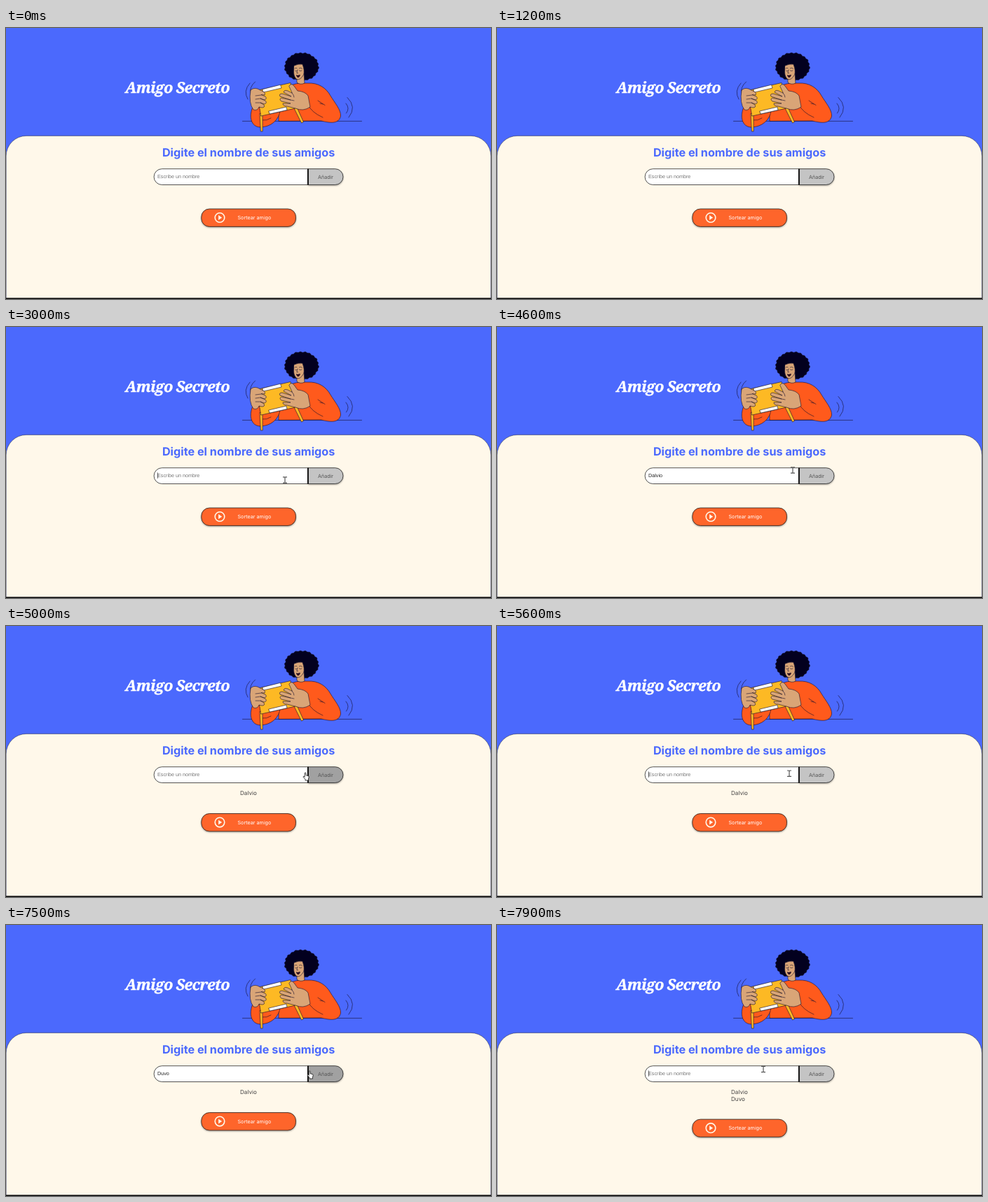
These frames come from a looping animation (692x388 px, 8 s). An HTML page:

```html
<!DOCTYPE html>
<html lang="es">
<head>
<meta charset="utf-8">
<title>Amigo Secreto</title>
<style>
  html, body { margin: 0; width: 100%; height: 100%; overflow: hidden; background: #4b69fd; }
  svg { display: block; width: 100vw; height: 100vh; }
  text { font-family: Inter, sans-serif; font-size: 7.2px; text-rendering: geometricPrecision; white-space: pre; }
  .title { font: italic 700 21.8px "Noto Serif", serif; letter-spacing: -.75px; fill: #fff; stroke: #fff; stroke-width: .35; }
  .heading { font-weight: 700; font-size: 16.23px; fill: #4b69fd; }
  .field { font-family: "Liberation Sans", Arial, sans-serif; }
  .friend { font-size: 8.1px; fill: #444; }
  .mid { text-anchor: middle; }
  .edge { stroke: #1a1a1a; stroke-width: .75; }
  .raised { filter: drop-shadow(.3px 1.8px 1.2px rgba(0, 0, 0, .36)); }
  .ink { stroke: #17102e; stroke-width: .6; stroke-linejoin: round; stroke-linecap: round; }
  .line { fill: none; }
  .skin { fill: #d9a577; }
  .shirt { fill: #ff5a1c; }
  .box { fill: #fdb924; }
</style>
</head>
<body>
<svg viewBox="0 0 692 388" preserveAspectRatio="none">
  <rect width="692" height="388" fill="#4b69fd"/>
  <text class="title" x="170" y="93.4">Amigo Secreto</text>

  <g class="ink">
    <path class="line" d="M337.5 133.4H507.5"/>
    <path class="line" d="M348 79Q338 90 345 102M355.500 77Q346 85 349.500 96M487 99.500Q501 113 489 128M485 108Q491 115 485.500 122"/>
    <path class="shirt" d="M389 133V100C394 88 405 80 420 79H430C446 78 457 86 463 97C469 107 478 117 477.500 126C475 138 462 136 450 133Z"/>
    <path id="hair" fill="#03001f"/>
    <path class="skin" d="M415 69V78Q420 82 426 79L425 64Z"/>
    <path class="skin" d="M411 54Q417 51 423 52Q426.500 61 424.500 67Q420 75 415 73.500Q410.500 70 410.500 63Z"/>
    <path class="line" d="M412 58Q413.500 56.500 415 57.500M418.500 57.500Q420.500 56.500 422.500 58M412.500 61.300Q413.800 62.500 415 61.300M418.500 61Q420.300 62.300 422 61M416 60L414.800 64.500H416.500"/>
    <path fill="#3a0914" d="M414.500 67.800Q417 68.500 419.500 67Q419 70.800 416.500 70.800Q414.500 70 414.500 67.800Z"/>
    <path class="shirt" d="M352 113C346 128 350 141 362 142C378 142 389 132 391 119L384 111Z"/>
    <path class="line" d="M431 110Q436 121 452 128M445 104L455 110.500M448 108L452 109M365 132Q372 133 378 129"/>
    <path class="box" d="M362 123L363.300 148H366.200L366 122ZM409 111L421.500 136L424.500 134.500L413 109Z"/>
    <path class="box" d="M358 89.500L406 78.500L413 115L364 126Z"/>
    <path fill="#fff" d="M366 87.700L391.500 81.300L393 86L367.500 92ZM375 119L400 113L401 117.500L376.500 123Z"/>
    <path class="skin" d="M349 89Q353 85 359 87L367 91Q371 93 369 96L364 95.500L370 98Q373 101 369 103L363 101L370 104Q373 107 369 109L363 107L368 110Q370 114 365 114L361 113Q359 119 353 117Q346 108 349 89Z"/>
    <path class="skin" d="M404 83Q407 78 411 83L416 90Q427 91 431 97L434 113Q424 120 413 115L401 112Q395 112 395 108L406 108L393 105Q389 102 393 100L406 103L391 98Q389 94 394 94L407 98L396 92Q397 88 402 90L408 93Z"/>
    <path class="line" d="M356 97L364 96M356 102L363 101M356 107L363 107M408 93Q411 96 411 99M406 103L411 104"/>
  </g>

  <path d="M.2 387V183.200A28.800 28.800 0 0 1 29 154.400H663A28.800 28.800 0 0 1 691.800 183.200V387Z" fill="#fff8ea" stroke="#101020" stroke-width=".45"/>
  <rect y="386.500" width="692" height="1.500" fill="#0a0a0a"/>
  <text class="heading mid" x="346.100" y="184">Digite el nombre de sus amigos</text>

  <path class="edge" d="M430.500 201.700H222.500A11.400 11.400 0 0 0 222.500 224.500H430.500Z" fill="#fff"/>
  <text id="entry" class="field" x="216" y="215.300"></text>
  <rect id="caret" y="208.400" width=".6" height="8.400" fill="#000"/>
  <g class="raised">
    <path id="add" class="edge" d="M431.200 201.700H469.600A11.400 11.400 0 0 1 469.600 224.500H431.200Z"/>
  </g>
  <path d="M430.900 201.500V224.700" stroke="#000" stroke-width="1.500"/>
  <text class="mid" x="456" y="215.500" fill="#555">Añadir</text>

  <text id="first" class="friend" x="334" y="241.900"></text>
  <text id="second" class="friend" x="334" y="251.500"></text>

  <g id="draw">
    <rect class="edge raised" x="278.800" y="259" width="134.700" height="25.400" rx="11.500" fill="#fe652b"/>
    <circle cx="305" cy="271.500" r="6.800" fill="none" stroke="#fff8ea" stroke-width="1.600"/>
    <path d="M303.100 268.100L308.200 271.500L303.100 274.900Z" fill="#fff8ea"/>
    <text x="330.500" y="274.100" fill="#fff">Sortear amigo</text>
  </g>

  <g id="pointer">
    <path id="arrow" d="M0 0V8.600L2 6.900L3.400 10L4.900 9.300L3.500 6.300H6.200Z" fill="#fff" stroke="#222" stroke-width=".8"/>
    <path id="beam" d="M-3 -4.200H-.7L0 -3.600L.7 -4.200H3M0 -3.600V3.600M-3 4.200H-.7L0 3.600L.7 4.200H3" fill="none" stroke="#555" stroke-width="1.200"/>
    <path id="hand" d="M-1.800 -4.500Q-.9 -5.700 0 -4.500V-1.200L3 -.6Q4.300 -.1 4.200 1.200L3.500 4.200V6H-1V4.500L-3.900 1.200Q-4 0 -2.900 .1L-1.800 1.300Z" fill="#fff" stroke="#111" stroke-width=".8"/>
  </g>
</svg>
<script>
const LOOP = 8000, STEP = 100, ROW = 9.6;
const FRIENDS = ['Dalvio', 'Duvo'];
const $ = id => document.getElementById(id);
const show = (el, on) => el.setAttribute('visibility', on ? 'visible' : 'hidden');

// time, x, y, pointer shape
const MOVES = [
  [2200, 427, 258.5, 'arrow'], [2400, 412, 232, 'arrow'], [2500, 402, 222, 'beam'],
  [2600, 398, 219, 'beam'], [4100, 398, 219, 'beam'], [4600, 422, 205, 'beam'],
  [4700, 433, 211, 'hand'], [4900, 436, 215, 'hand'], [5000, 428, 215, 'hand'],
  [5100, 422, 213, 'beam'], [5800, 415, 210.5, 'beam'], [7200, 415, 210.5, 'beam'],
  [7400, 434, 214, 'hand'], [7600, 434, 214, 'hand'], [7700, 412, 210, 'beam'],
  [7900, 380, 206.5, 'beam']
];
// time, friend, letters typed
const KEYS = [
  [3300, 0, 1], [3500, 0, 2], [3700, 0, 3], [3900, 0, 5], [4100, 0, 6], [5000, 0, 0],
  [5900, 1, 1], [6300, 1, 2], [6600, 1, 3], [6700, 1, 4], [7600, 1, 0]
];
// spans in which the caret is lit
const CARET = [[2600, 3100], [3300, 4600], [5500, 7300], [7800, LOOP]];

function hairPath() {
  let d = '';
  for (let i = 0; i <= 180; i++) {
    const a = i * Math.PI / 90, r = 1 + .025 * Math.sin(a * 22) + .012 * Math.sin(a * 9);
    d += (i ? 'L' : 'M') + (421.8 + 24 * r * Math.cos(a)).toFixed(1) + ' ' + (55.5 + 19.8 * r * Math.sin(a)).toFixed(1);
  }
  return d + 'Z';
}

const latest = (list, t) => list.filter(k => k[0] <= t).pop();

function pointerAt(t) {
  const from = latest(MOVES, t);
  if (!from) return null;
  const to = MOVES[MOVES.indexOf(from) + 1] || from;
  const p = to === from ? 0 : (t - from[0]) / (to[0] - from[0]);
  return { x: from[1] + (to[1] - from[1]) * p, y: from[2] + (to[2] - from[2]) * p, shape: from[3] };
}

function render(t) {
  const p = pointerAt(t), key = latest(KEYS, t);
  const typed = key ? FRIENDS[key[1]].slice(0, key[2]) : '';
  const entry = $('entry');
  entry.textContent = typed || 'Escribe un nombre';
  entry.setAttribute('fill', typed ? '#222' : '#777');

  $('caret').setAttribute('x', 216.3 + (typed ? entry.getComputedTextLength() : 0));
  show($('caret'), CARET.some(([a, b]) => t >= a && t < b));

  const added = (t >= 5000) + (t >= 7600);
  $('first').textContent = added > 0 ? FRIENDS[0] : '';
  $('second').textContent = added > 1 ? FRIENDS[1] : '';
  $('draw').setAttribute('transform', `translate(0 ${added * ROW})`);

  $('add').setAttribute('fill', p && p.shape === 'hand' ? '#a1a1a1' : '#c4c4c4');
  for (const shape of ['arrow', 'beam', 'hand']) show($(shape), p && p.shape === shape);
  if (p) $('pointer').setAttribute('transform', `translate(${p.x} ${p.y})`);
}

$('hair').setAttribute('d', hairPath());
const start = performance.now();
function tick() {
  const t = (performance.now() - start) % LOOP;
  render(Math.floor(t / STEP) * STEP);
  requestAnimationFrame(tick);
}
tick();
</script>
</body>
</html>
```
